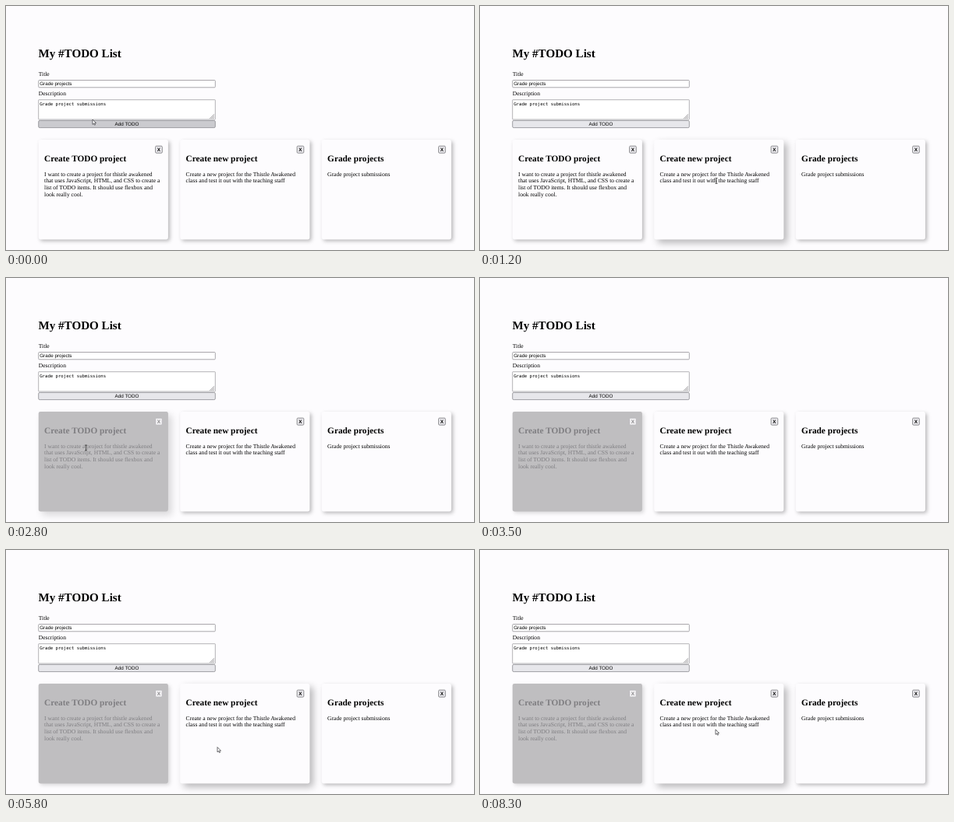
Animation of 600x314 px, one loop 8.4 s. Source, as an HTML page with a canvas:

```html
<!DOCTYPE html>
<html lang="en">
<head>
<meta charset="utf-8">
<title>TODO list</title>
<style>
  html, body { margin: 0; width: 100%; height: 100%; overflow: hidden; background: #fdfcfe; }
  canvas { display: block; }
</style>
</head>
<body>
<canvas id="stage" width="600" height="314"></canvas>
<script>
const ctx = document.getElementById('stage').getContext('2d');
ctx.textRendering = 'geometricPrecision';

const LOOP = 8400, STEP = 100;
const PAGE = '#fdfcfe', INK = '#000';
const SERIF = '"Liberation Serif", serif';
const SANS = '"Liberation Sans", sans-serif';
const MONO = '"DejaVu Sans Mono", monospace';

const cards = [
  { x: 41.7, title: 'Create TODO project', lines: [
    'I want to create a project for thistle awakened',
    'that uses JavaScript, HTML, and CSS to create a',
    'list of TODO items. It should use flexbox and',
    'look really cool.'] },
  { x: 223.2, title: 'Create new project', lines: [
    'Create a new project for the Thistle Awakened',
    'class and test it out with the teaching staff'] },
  { x: 404.7, title: 'Grade projects', lines: ['Grade project submissions'] }
];

// Pointer path: time, x, y
const path = [
  [0, 111, 146], [500, 111, 160], [800, 111, 160], [1200, 303, 225],
  [1700, 303, 225], [2300, 102.5, 218.5], [3200, 102.5, 218.5], [3500, 206, 291],
  [5300, 226, 262], [5900, 280, 252], [6100, 280, 252], [6400, 268, 273],
  [6900, 268, 273], [7200, 308, 247], [7300, 308, 247], [7600, 320, 234],
  [8200, 320, 234], [8300, 302, 231]
];

const mix = (a, b, k) => a + (b - a) * k;
const ramp = (t, a, b) => Math.min(1, Math.max(0, (t - a) / (b - a)));

function text(str, x, y, font, color = INK, align = 'left') {
  ctx.font = font;
  ctx.fillStyle = color;
  ctx.textAlign = align;
  ctx.fillText(str, x, y);
}

function box(x, y, w, h, r, fill, stroke) {
  ctx.beginPath();
  ctx.roundRect(x, y, w, h, r);
  ctx.fillStyle = fill;
  ctx.fill();
  if (!stroke) return;
  ctx.strokeStyle = stroke;
  ctx.lineWidth = 0.8;
  ctx.stroke();
}

function drawForm(t) {
  text('My #TODO List', 41.5, 66, `bold 15.1px ${SERIF}`);
  text('Title', 41.7, 90.4, `7.55px ${SERIF}`);
  box(41.7, 95.5, 226.6, 9.3, 1, '#fff', '#939296');
  text('Grade projects', 43.2, 102.4, `6.3px ${SANS}`);
  text('Description', 41.7, 115.3, `7.55px ${SERIF}`);
  box(41.7, 120.7, 226.6, 25.3, 0.5, '#fff', '#a09fa3');
  text('Grade project submissions', 43.2, 128.2, `5.65px ${MONO}`);

  ctx.strokeStyle = '#77767a';
  ctx.lineWidth = 0.7;
  ctx.beginPath();
  for (const d of [1.8, 3.8, 5.8]) {
    ctx.moveTo(267 - d, 145);
    ctx.lineTo(267, 145 - d);
  }
  ctx.stroke();

  const shade = Math.round(mix(203, 231, ramp(t, 0, 300)));
  box(41.7, 147.4, 226.6, 9.2, 1.5, `rgb(${shade},${shade},${shade + 4})`, '#8a898e');
  text('Add TODO', 155, 154.4, `6.3px ${SANS}`, INK, 'center');
}

function drawCard({ x, title, lines }, hover, done) {
  const ink = done ? '#7f7e81' : INK;
  ctx.save();
  ctx.shadowColor = `rgba(0,0,0,${done ? 0.15 : 0.28})`;
  ctx.shadowOffsetX = ctx.shadowOffsetY = mix(2.2, 4.5, hover);
  ctx.shadowBlur = mix(5, 9.5, hover);
  box(x, 172, 166.2, 128.4, 2.4, done ? '#bfbec0' : PAGE);
  ctx.restore();

  box(x + 149.9, 180.2, 8.7, 9, 1.2, done ? '#f0eff1' : '#e9e8ec', done ? '#b4b3b6' : '#77767a');
  text('X', x + 154.2, 187, `bold 6.3px ${SANS}`, done ? '#88878a' : INK, 'center');
  text(title, x + 7.4, 199.7, `bold 11.3px ${SERIF}`, ink);
  lines.forEach((line, i) => text(line, x + 7.4, 218.5 + i * 8.7, `7.58px ${SERIF}`, ink));
}

function pointerAt(t) {
  let i = 0;
  while (i < path.length - 2 && t > path[i + 1][0]) i++;
  const [t0, x0, y0] = path[i], [t1, x1, y1] = path[i + 1];
  const k = ramp(t, t0, t1);
  return [mix(x0, x1, k), mix(y0, y1, k)];
}

function drawArrow(x, y) {
  const pts = [[0, 0], [0, 6.4], [1.5, 5.1], [2.5, 7.2], [3.5, 6.8], [2.6, 4.7], [4.5, 4.6]];
  ctx.beginPath();
  pts.forEach(([dx, dy]) => ctx.lineTo(x + dx, y + dy));
  ctx.closePath();
  ctx.fillStyle = '#fff';
  ctx.fill();
  ctx.strokeStyle = '#3c3c40';
  ctx.lineWidth = 0.75;
  ctx.stroke();
}

function drawBeam(x, y) {
  ctx.strokeStyle = '#333';
  ctx.lineWidth = 0.8;
  ctx.beginPath();
  ctx.moveTo(x, y - 3.4);
  ctx.lineTo(x, y + 3.4);
  for (const dy of [-3.4, 3.4]) {
    ctx.moveTo(x - 1.5, y + dy);
    ctx.lineTo(x + 1.5, y + dy);
  }
  ctx.stroke();
}

function drawPointer(t) {
  if (t >= 3500 && t < 5400) return;
  const [x, y] = pointerAt(t);
  const overText = (t >= 1200 && t < 1800) || (t >= 2200 && t < 3300);
  (overText ? drawBeam : drawArrow)(x, y);
}

function draw(t) {
  ctx.fillStyle = PAGE;
  ctx.fillRect(0, 0, 600, 314);
  drawForm(t);
  const hovers = [
    ramp(t, 1900, 2300) - ramp(t, 2800, 3000),
    ramp(t, 900, 1200) - ramp(t, 1700, 2100) + ramp(t, 5300, 5700),
    0
  ];
  cards.forEach((card, i) => drawCard(card, hovers[i], i === 0 && t >= 2800));
  drawPointer(t);
}

const start = performance.now();
function tick() {
  const t = (performance.now() - start) % LOOP;
  draw(Math.floor(t / STEP) * STEP);
  requestAnimationFrame(tick);
}
tick();
</script>
</body>
</html>
```
